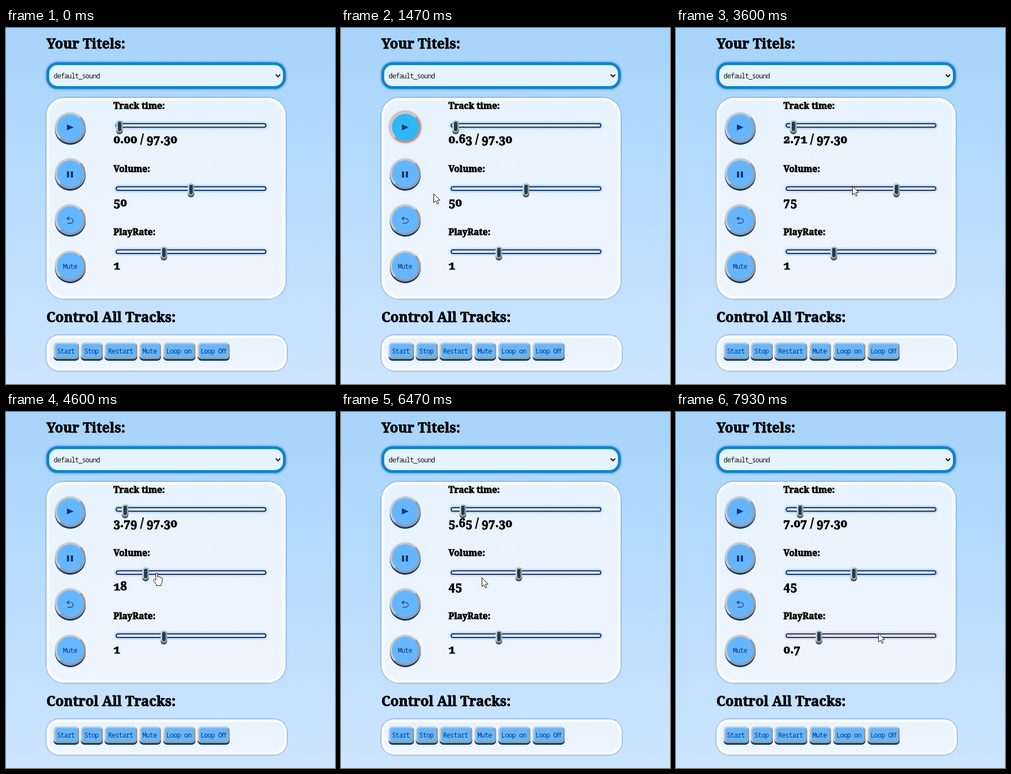
Recreate the animation shown at these times as an HTML page. Size 594 by 643 pixels, loop 8000 ms.

```html
<!DOCTYPE html>
<html lang="en">
<head>
<meta charset="utf-8">
<title>Track mixer</title>
<style>
html, body { margin: 0; width: 100%; height: 100%; overflow: hidden; }
body { position: relative; background: linear-gradient(#a7d4fb, #cce5ff); }
div { position: absolute; box-sizing: border-box; }
svg { position: absolute; left: 0; top: 0; }
.select { left: 73px; top: 62px; width: 432px; height: 48px; border: 5px solid #0a86cf; border-radius: 20px;
  background: #e6f3fd; box-shadow: 0 0 4px #3c6cb4; }
.panel { left: 73px; width: 432px; border: 5px solid #fbfdff; background: linear-gradient(#e7f3fe, #eef5ff);
  box-shadow: 0 0 2px .5px #3f78b8; }
.btn, .thumb { border: 4px solid; border-color: #c6cacc #999c9e #999c9e #c6cacc; }
.btn { background: #66b6ff; box-shadow: 0 3px #0b3875; }
.round { left: 88px; width: 56px; height: 56px; border-radius: 50%; }
.small { top: 568px; height: 30px; border-width: 3px; border-radius: 7px; }
.track { left: 198px; width: 272px; height: 8px; border: 2px solid #0b3875; border-radius: 5px; background: #fff; }
.thumb { width: 12px; height: 23px; border-width: 3px; border-radius: 6px; background: #173f55;
  box-shadow: 0 3px #41505c; }
text { white-space: pre; }
.serif { font-family: "Noto Serif", serif; font-weight: 900; font-variant-numeric: oldstyle-nums;
  stroke: #000; stroke-width: .9px; stroke-linejoin: round; }
.mono { font: 12px "Noto Sans Mono", monospace; letter-spacing: -.8px; fill: #0b3875; }
</style>
</head>
<body>
<div class="select"></div>
<div class="panel" style="top:126px;height:363px;border-radius:32px"></div>
<div class="panel" style="top:555px;width:434px;height:64px;border-radius:23px"></div>
<section id="controls"></section>
<svg width="594" height="643">
  <g id="labels"></g>
  <path d="M487 84l4 4 4-4" fill="none" stroke="#111" stroke-width="2"/>
  <g fill="#0b3875">
    <path d="M110 174L122 179.5 110 185Z"/>
    <path d="M110 259h4v11h-4zM117 259h4v11h-4z"/>
    <path d="M114 341l-4 3 4 3M110 344h7a4.3 4.3 0 0 1 0 8.6h-6" fill="none" stroke="#0b3875" stroke-width="1.2"/>
  </g>
  <g id="cursor" fill="#fff" stroke="#111" stroke-linejoin="round">
    <path id="arrow" d="M.5 .5V16.5L4.2 13 6.7 18.7 9.2 17.6 6.8 12H11.8Z"/>
    <path id="hand" d="M-2.5 13V1Q-2.5-.5-1-.5T.5 1V7Q1 5.800 2.300 6T3.600 7.500Q4.300 6.600 5.400 7T6.500 8.500Q7.300 7.700 8.300 8.300T9 10V15Q9 18 7 20V22.500H-1.500V20.500L-6 14.500Q-7.300 12-5.700 11.300T-2.500 13Z"/>
  </g>
</svg>
<script>
const LOOP = 8000, FRAME = 1000 / 15, LENGTH = 97.3;
const LAG = 137, VOLUME_DOWN = 2600, VOLUME_UP = 4900, RATE_DOWN = 7260;
const BUTTONS = [180, 263, 346, 430], TRACKS = [176, 290, 404];
const $ = id => document.getElementById(id);
const clamp = (v, lo = 0, hi = 1) => Math.max(lo, Math.min(hi, v));

function box(cls, style) {
  const el = document.createElement('div');
  el.className = cls;
  Object.assign(el.style, style);
  $('controls').append(el);
  return el;
}

function label(str, x, y, cls, size = 12, anchor = 'start') {
  const el = document.createElementNS('http://www.w3.org/2000/svg', 'text');
  el.textContent = str;
  el.setAttribute('class', cls);
  el.setAttribute('x', x);
  el.setAttribute('y', y);
  el.setAttribute('text-anchor', anchor);
  el.style.fontSize = size + 'px';
  $('labels').append(el);
  return el;
}

label('Your Titels:', 73, 37, 'serif', 24.5);
label('Control All Tracks:', 73, 531, 'serif', 24.5);
label('default_sound', 86, 91, 'mono').style.fill = '#111';
label('Mute', 115.6, 435, 'mono', 12, 'middle');

const [play] = BUTTONS.map(y => box('btn round', { top: y - 28 + 'px' }));

// Row of buttons, each as wide as its text; the last one ends in an ff ligature
let left = 86;
for (const str of ['Start', 'Stop', 'Restart', 'Mute', 'Loop on', 'Loop O\ufb00']) {
  const width = str.length * 6.4 + 13.7;
  box('btn small', { left: left + 'px', width: width + 'px' });
  label(str, left + width / 2 - .9, 588, 'mono', 12, 'middle');
  left += width + 3.7;
}

const [time, volume, rate] = ['Track time:', 'Volume:', 'PlayRate:'].map((str, i) => {
  const y = TRACKS[i];
  label(str, 194, y - 30, 'serif', 16);
  return {
    track: box('track', { top: y - 4 + 'px' }),
    thumb: box('thumb', { top: y - 10 + 'px' }),
    value: label('', 194, y + 32, 'serif', 21)
  };
});

// Stops of the pointer: time, x, y
const stops = [
  [67, 550, 638], [660, 118, 183], [940, 118, 184], [1470, 167, 299], [1740, 320, 291], [2400, 361, 291],
  [VOLUME_DOWN, 333.5, 291], [3300, 426, 291], [3467, 397, 287], [3600, 319, 285], [4000, 222, 288],
  [4350, 232, 291], [VOLUME_UP, 320.5, 291], [5200, 320, 288], [5670, 249, 188], [6070, 245, 190],
  [6870, 262, 407], [7800, 258, 404], [7930, 365, 399]
];
// Playback position: time, seconds
const clock = [[730, 0], [1360, .63], [2320, 1.59], [3440, 2.71], [5610, 4.88], [7150, 6.42], [7900, 7.07]];

// Linear between keys; a step size turns the line into a staircase
function at(keys, t, col = 1, step = 0) {
  const i = keys.findIndex(k => k[0] > t);
  if (i < 0) return keys[keys.length - 1][col];
  if (!i) return keys[0][col];
  const a = keys[i - 1], b = keys[i], d = b[col] - a[col];
  const p = (t - a[0]) / (b[0] - a[0]);
  const n = step && Math.round(d / step);
  return a[col] + d * (n ? Math.floor(p * n) / n : p);
}

// Slider share under the pointer, which the thumb follows late
const share = t => (at(stops, t) - 205) / 257;

function setSlider(s, part, str, focus) {
  s.thumb.style.left = 199.3 + 257 * part + 'px';
  s.value.textContent = str;
  s.track.style.boxShadow = '0 0 4px ' + (focus ? '#b87a92' : '#2f78c8');
}

function drawPointer(t) {
  const x = at(stops, t), y = at(stops, t, 2);
  const hand = BUTTONS.some(b => Math.hypot(x - 116, y - b) < 28) ||
    x > 198 && x < 470 && TRACKS.some(b => Math.abs(y - b) < 4.8);
  $('cursor').style.display = t < 60 ? 'none' : '';
  $('cursor').setAttribute('transform', `translate(${Math.round(x)} ${Math.round(y)})`);
  $('arrow').style.display = hand ? 'none' : '';
  $('hand').style.display = hand ? '' : 'none';
}

function draw(now) {
  const t = Math.floor((now % LOOP + 5) / FRAME) * FRAME + 4;

  const sec = at(clock, t, 1, .26);
  const vol = Math.round(100 * share(clamp(t - LAG, VOLUME_DOWN, VOLUME_UP)));
  const speed = t < RATE_DOWN ? 1 : Math.round(1 + 29 * share(Math.max(t - LAG, RATE_DOWN))) / 10;
  setSlider(time, sec / LENGTH, sec.toFixed(2) + ' / ' + LENGTH.toFixed(2), false);
  setSlider(volume, vol / 100, vol, t > VOLUME_DOWN + 60 && t < RATE_DOWN);
  setSlider(rate, (speed - .1) / 2.9, speed, t >= RATE_DOWN);

  const on = clamp((t - 660) / 200) - clamp((t - VOLUME_DOWN - 60) / 200);
  const mix = (a, b) => a + (b - a) * on;
  play.style.background = `rgb(${mix(102, 44)},${mix(182, 184)},${mix(255, 246)})`;
  play.style.top = 152 - on + 'px';
  play.style.boxShadow = `0 ${3 - 3 * on}px ${4 * on}px rgb(${mix(11, 190)},${mix(56, 70)},${mix(117, 80)})`;

  drawPointer(t);
}

const start = performance.now();
function tick() {
  draw(performance.now() - start);
  requestAnimationFrame(tick);
}
tick();
</script>
</body>
</html>
```
